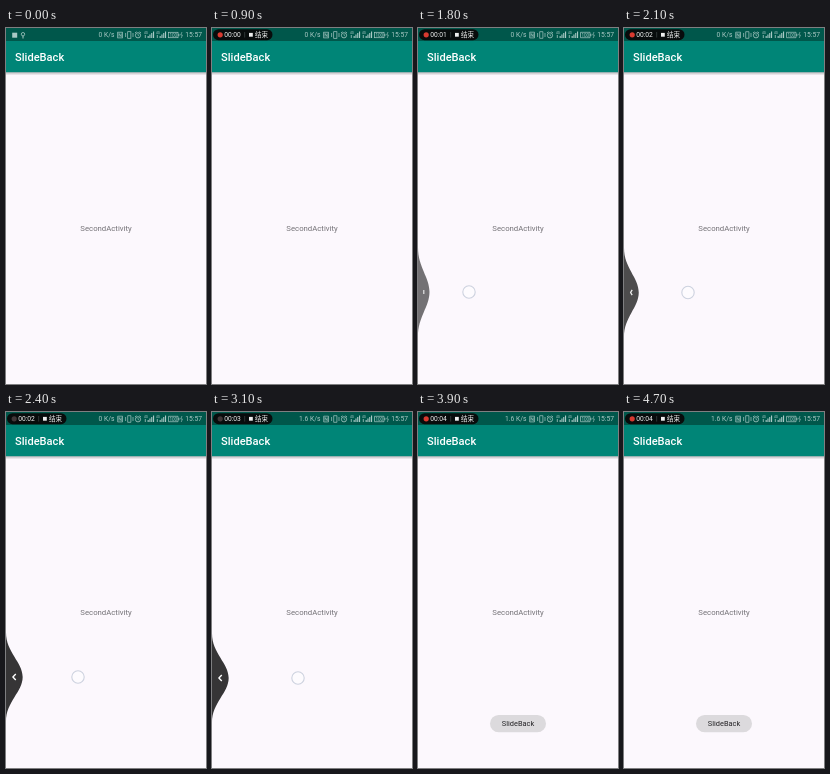
Animation of 200 by 356 pixels, one loop 4800 ms. Source, as an HTML page with a canvas:

```html
<!DOCTYPE html>
<html lang="en">
<head>
<meta charset="utf-8">
<title>SlideBack</title>
<style>
  html, body { margin: 0; width: 100%; height: 100%; overflow: hidden; background: #fcf8fd; }
  canvas { display: block; width: 200px; height: 356px; }
</style>
</head>
<body>
<canvas id="stage"></canvas>
<script>
const W = 200, H = 356, LOOP = 4800, STEP = 100;
const SANS = 'Roboto, sans-serif';
const STATUS = '#a9c9c5';
const MAX_SLIDE = W / 12, BACK_HEIGHT = H / 4, DRAG_RATE = 4, ARROW = 2.9;
const SECONDS = [100, 1100, 2000, 2900, 3800];
// time, x, y of the finger
const DRAG = [[1400, 5, 263], [1600, 29, 263.5], [1800, 51, 264], [2100, 64, 264.5],
              [2400, 72, 265], [2700, 79, 265.5], [3100, 86, 266]];
const RELEASE = 3400;

const canvas = document.getElementById('stage');
const ctx = canvas.getContext('2d');
const dpr = window.devicePixelRatio || 1;
canvas.width = W * dpr;
canvas.height = H * dpr;

const clamp = v => Math.max(0, Math.min(1, v));

function rect(x, y, w, h, color) {
  ctx.fillStyle = color;
  ctx.fillRect(x, y, w, h);
}

function pill(x, y, w, h, color) {
  ctx.fillStyle = color;
  ctx.beginPath();
  ctx.roundRect(x, y, w, h, h / 2);
  ctx.fill();
}

function circle(x, y, r, fill, stroke, width) {
  ctx.beginPath();
  ctx.arc(x, y, r, 0, Math.PI * 2);
  if (fill) { ctx.fillStyle = fill; ctx.fill(); }
  if (stroke) { ctx.strokeStyle = stroke; ctx.lineWidth = width; ctx.stroke(); }
}

function line(points, color, width) {
  ctx.beginPath();
  points.forEach(([x, y]) => ctx.lineTo(x, y));
  ctx.strokeStyle = color;
  ctx.lineWidth = width;
  ctx.stroke();
}

function box(x, y, w, h, width = 0.7) {
  ctx.strokeStyle = STATUS;
  ctx.lineWidth = width;
  ctx.strokeRect(x, y, w, h);
}

function label(text, x, y, size, color, align = 'left', weight = 400, family = SANS) {
  ctx.font = `${weight} ${size}px ${family}`;
  ctx.textAlign = align;
  ctx.fillStyle = color;
  ctx.fillText(text, x, y);
}

function signal(x) {
  label('4G', x, 6.3, 3.2, STATUS);
  line([[x + 1.3, 7], [x + 1.3, 10]], STATUS, 0.8);
  for (let i = 0; i < 4; i++) {
    const h = 2 + i * 1.5;
    rect(x + 3.6 + i * 1.8, 10 - h, 1.1, h, STATUS);
  }
}

function statusIcons() {
  box(111.7, 4.2, 4.8, 5.7);
  line([[113, 8.7], [113, 5.4], [115.2, 8.7], [115.2, 5.4]], STATUS, 0.7);

  box(121.7, 3.7, 3.2, 6.6);
  for (const x of [119.6, 127]) line([[x, 5], [x, 9]], STATUS, 0.7);

  circle(132, 7.3, 2.6, null, STATUS, 0.8);
  line([[132, 5.8], [132, 7.4], [133.2, 8]], STATUS, 0.6);
  line([[129, 5], [130.5, 3.8]], STATUS, 0.8);
  line([[133.5, 3.8], [135, 5]], STATUS, 0.8);

  signal(138);
  signal(150);

  box(162.5, 4.3, 9.5, 5.4);
  rect(172.4, 5.8, 0.9, 2.4, STATUS);
  label('100', 167.3, 8.8, 4.6, STATUS, 'center');
  line([[176, 4], [174.7, 7], [176.4, 7], [175.2, 10]], STATUS, 0.6);
  label('15:57', 196, 9.4, 6.7, STATUS, 'right');
}

function notifications() {
  rect(6.2, 4.7, 5, 5, STATUS);
  circle(17, 6.2, 1.7, null, STATUS, 0.8);
  line([[17, 8], [17, 10.5]], STATUS, 1);
}

function recorder(t) {
  const count = SECONDS.filter(s => t >= s).length - 1;
  const phase = t - SECONDS[count];
  const dim = phase > 150 && phase < 550;
  pill(1, 1.2, 59.5, 11, '#080c0c');
  circle(8.2, 6.8, 2.6, dim ? '#403738' : '#d83a30');
  label('00:0' + count, 12.2, 9.2, 6.7, '#f2f2f2');
  rect(32.5, 4, 0.6, 5.5, '#475050');
  rect(37, 4.9, 3.8, 3.8, '#eee');
  label('结束', 43, 9.2, 6.6, '#f2f2f2', 'left', 400,
    '"Noto Sans CJK SC", "Noto Sans CJK", sans-serif');
}

function bars(t) {
  const shade = ctx.createLinearGradient(0, 44, 0, 47.5);
  shade.addColorStop(0, 'rgba(0,0,0,.28)');
  shade.addColorStop(1, 'rgba(0,0,0,0)');
  rect(0, 44, W, 3.5, shade);
  rect(0, 13, W, 31.2, '#008577');
  rect(0, 0, W, 13, '#00574b');
  if (t < SECONDS[0]) notifications();
  else recorder(t);
  label(t < 2700 ? '0 K/s' : '1.6 K/s', 108.4, 9.4, 6.7, STATUS, 'right');
  statusIcons();
  label('SlideBack', 9, 33.2, 11.1, '#fff', 'left', 500);
}

function fingerAt(t) {
  const last = DRAG[DRAG.length - 1];
  if (t >= last[0]) return last.slice(1);
  const i = DRAG.findIndex(p => p[0] > t);
  const [t0, x0, y0] = DRAG[i - 1], [t1, x1, y1] = DRAG[i];
  const k = (t - t0) / (t1 - t0);
  return [x0 + (x1 - x0) * k, y0 + (y1 - y0) * k];
}

function backHandle(length, y) {
  const h = BACK_HEIGHT, top = y - h / 2, zoom = length / MAX_SLIDE;
  ctx.beginPath();
  ctx.moveTo(0, top);
  ctx.bezierCurveTo(0, top + h * 2 / 9, length, top + h / 3, length, y);
  ctx.bezierCurveTo(length, top + h * 2 / 3, 0, top + h * 7 / 9, 0, top + h);
  ctx.fillStyle = `rgba(0,0,0,${zoom * 200 / 255})`;
  ctx.fill();

  const bend = Math.max(0, zoom - 0.75) * 2 * ARROW;
  const mid = length / 2, reach = zoom * ARROW;
  ctx.lineJoin = 'round';
  line([[mid + bend, y - reach], [mid - bend, y], [mid + bend, y + reach]],
    `rgba(255,255,255,${zoom})`, 1.4);
}

function drag(t) {
  if (t < DRAG[0][0] || t >= RELEASE) return;
  const [x, y] = fingerAt(t);
  const length = Math.min(MAX_SLIDE, (x - DRAG[0][1]) / DRAG_RATE);
  if (length > 0) backHandle(length, y);
  circle(x, y, 6.2, 'rgba(255,255,255,.45)', '#cdd2df', 1.1);
}

function toast(t) {
  ctx.globalAlpha = clamp((t - RELEASE) / 400);
  pill(72, 303, 56, 17.3, '#dcdadd');
  label('SlideBack', 100, 314.3, 7.4, '#242326', 'center');
  ctx.globalAlpha = 1;
}

function draw(now) {
  const t = Math.floor(now % LOOP / STEP) * STEP;
  ctx.setTransform(dpr, 0, 0, dpr, 0, 0);
  rect(0, 0, W, H, '#fcf8fd');
  bars(t);
  label('SecondActivity', 100, 203.4, 7.78, '#737176', 'center');
  drag(t);
  toast(t);
}

const start = performance.now();
function frame() {
  draw(performance.now() - start);
  requestAnimationFrame(frame);
}
frame();
</script>
</body>
</html>
```
